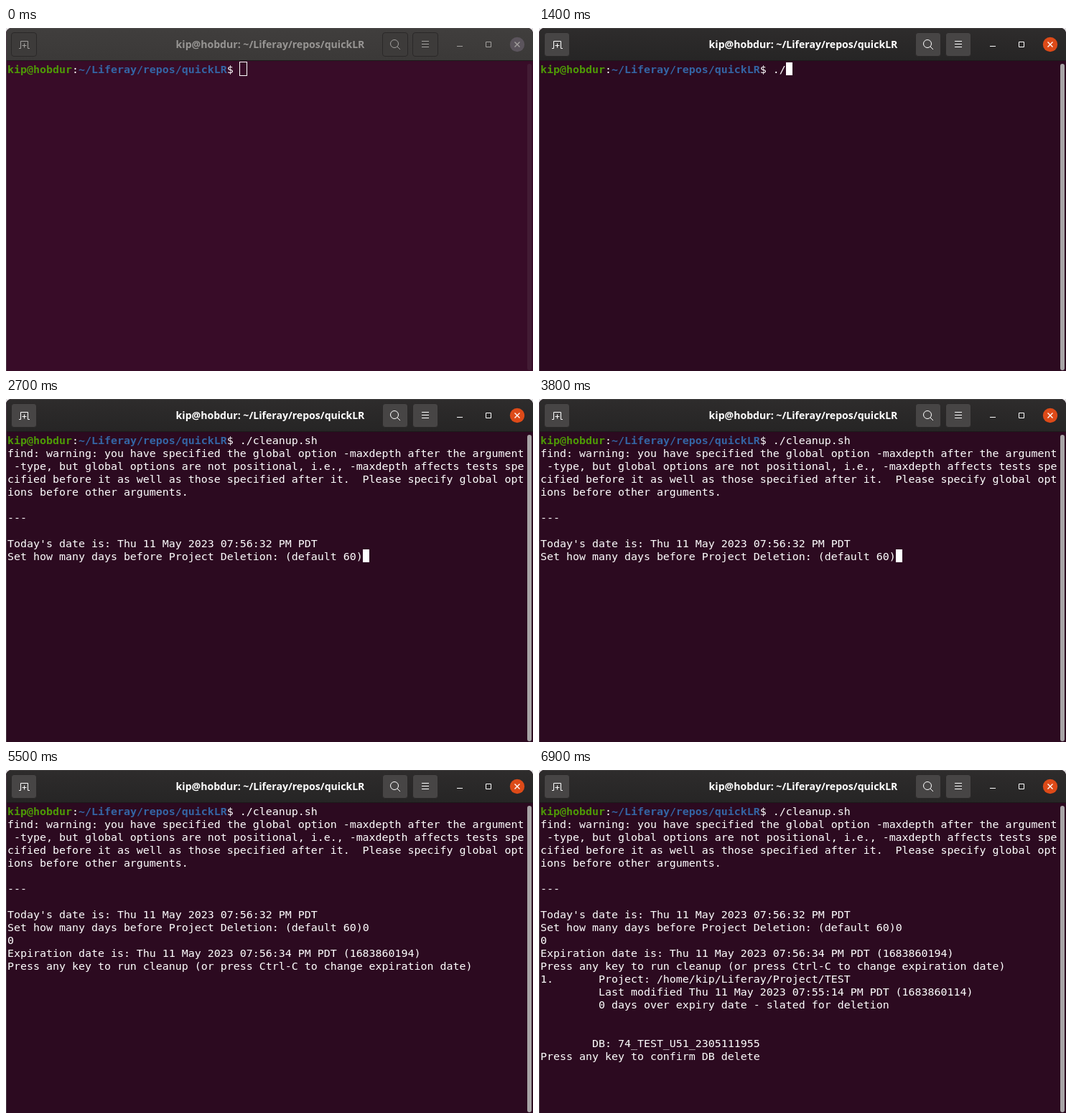
An HTML page for the animation above (8 s loop, 734 by 479 pixels).

```html
<!DOCTYPE html>
<html lang="en">
<head>
<meta charset="utf-8">
<title>Terminal</title>
<style>
  html, body { margin: 0; width: 100%; height: 100%; overflow: hidden; background: #e6e4e6; }
  .win, .win * { animation-duration: 8s; animation-timing-function: step-end; animation-iteration-count: infinite; }
  .win { position: relative; width: 734px; height: 479px; overflow: hidden; border-radius: 8px 8px 0 0; animation-name: body; }
  .win::after { content: ""; position: absolute; inset: 0; border-left: 1px solid #4b3a46; }
  @keyframes body { 0% { background: #380c28; } 6.25%, 100% { background: #2c0a20; } }

  .bar { position: absolute; left: 0; top: 0; width: 734px; height: 46px; box-sizing: border-box; border-bottom: 1px solid #1c1a1a; animation-name: bar; }
  @keyframes bar {
    0% { background: linear-gradient(#403e3d, #3b3938); box-shadow: inset 0 1px #4c4a49; }
    6.25%, 100% { background: linear-gradient(#2e2c2c, #262525); box-shadow: inset 0 1px #434141; }
  }
  .title { position: absolute; left: 0; width: 736px; top: 0; text-align: center; font: bold 14.1px/45px "Noto Sans", sans-serif; animation-name: title; }
  @keyframes title { 0% { color: #979593; } 6.25%, 100% { color: #fff; } }

  svg { position: absolute; left: 0; top: 0; }
  .btn { stroke: #1d1b1b; animation-name: btn; }
  @keyframes btn {
    0% { fill: #3d3b3a; stroke: #2a2828; }
    6.25% { fill: #3c3a3a; }
    7.5% { fill: #424040; }
    8.75%, 100% { fill: #474545; }
  }
  .icon { fill: none; animation-name: icon; }
  @keyframes icon {
    0% { stroke: #a3a19f; }
    6.25% { stroke: #c4c2c2; }
    7.5% { stroke: #e4e3e3; }
    8.75%, 100% { stroke: #fff; }
  }
  .ctl { fill: none; animation-name: ctl; }
  @keyframes ctl { 0% { stroke: #a3a19f; } 6.25%, 100% { stroke: #fff; } }
  .close { animation-name: close; }
  @keyframes close { 0% { fill: #5b545c; } 6.25%, 100% { fill: #dd4a18; } }
  .thumb { animation-name: thumb; }
  @keyframes thumb { 0% { fill: #421c34; } 6.25%, 100% { fill: #a8a4a6; } }

  pre { position: absolute; left: 2px; top: 49px; margin: 0; color: #fff; font: 14.95px/18px "DejaVu Sans Mono", monospace; }
  pre b { color: #4e9a06; }
  pre b + b, pre .path { color: #3465a4; }

  /* text that appears at a given time */
  .t1300 { animation-name: t1300; } @keyframes t1300 { 0% { visibility: hidden; } 16.25%, 100% { visibility: visible; } }
  .t1400 { animation-name: t1400; } @keyframes t1400 { 0% { visibility: hidden; } 17.5%, 100% { visibility: visible; } }
  .t1700 { animation-name: t1700; } @keyframes t1700 { 0% { visibility: hidden; } 21.25%, 100% { visibility: visible; } }
  .t1800 { animation-name: t1800; } @keyframes t1800 { 0% { visibility: hidden; } 22.5%, 100% { visibility: visible; } }
  .t2100 { animation-name: t2100; } @keyframes t2100 { 0% { visibility: hidden; } 26.25%, 100% { visibility: visible; } }
  .t2700 { animation-name: t2700; } @keyframes t2700 { 0% { visibility: hidden; } 33.75%, 100% { visibility: visible; } }
  .t4500 { animation-name: t4500; } @keyframes t4500 { 0% { visibility: hidden; } 56.25%, 100% { visibility: visible; } }
  .t4900 { animation-name: t4900; } @keyframes t4900 { 0% { visibility: hidden; } 61.25%, 100% { visibility: visible; } }
  .t6300 { animation-name: t6300; } @keyframes t6300 { 0% { visibility: hidden; } 78.75%, 100% { visibility: visible; } }
  .t6500 { animation-name: t6500; } @keyframes t6500 { 0% { visibility: hidden; } 81.25%, 100% { visibility: visible; } }
  .t6900 { animation-name: t6900; } @keyframes t6900 { 0% { visibility: hidden; } 86.25%, 100% { visibility: visible; } }

  .cursor { position: absolute; left: 0; top: 0; width: 9px; height: 18px; animation-name: move, fill, blink; }
  @keyframes move {
    0% { transform: translate(326px, 48px); }
    16.25% { transform: translate(335px, 48px); }
    17.5% { transform: translate(344px, 48px); }
    21.25% { transform: translate(353px, 48px); }
    22.5% { transform: translate(362px, 48px); }
    26.25% { transform: translate(443px, 48px); }
    33.75% { transform: translate(497px, 210px); }
    56.25% { transform: translate(506px, 210px); }
    61.25% { transform: translate(650px, 264px); }
    78.75% { transform: translate(2px, 354px); }
    81.25%, 100% { transform: translate(2px, 390px); }
  }
  @keyframes fill {
    0% { background: transparent; outline: 1px solid #fff; }
    6.25%, 100% { background: #fff; outline: 0 solid transparent; }
  }
  @keyframes blink {
    0% { opacity: 1; }
    40% { opacity: 0; }
    47.5% { opacity: 1; }
    68.75% { opacity: 0; }
    78.75% { opacity: 1; }
    86.25%, 100% { opacity: 0; }
  }
</style>
</head>
<body>
<div class="win">
  <div class="bar"></div>
  <div class="title">kip@hobdur: ~/Liferay/repos/quickLR</div>
  <svg width="734" height="479">
    <g class="btn">
      <rect x="7.5" y="6.5" width="35" height="33" rx="3.5"/>
      <rect x="524.5" y="6.5" width="35" height="33" rx="3.5"/>
      <rect x="566.5" y="6.5" width="35" height="33" rx="3.5"/>
    </g>
    <g class="icon">
      <path d="M18 28.5h2.5v-10h10v10H33M22.5 24.5h6M25.5 21.5v6"/>
      <circle cx="541" cy="22" r="5.5"/>
      <path d="M545 26l4 4M579 18.5h10M579 22.5h10M579 26.5h10"/>
    </g>
    <circle class="close" cx="712" cy="23" r="10.2"/>
    <g class="ctl">
      <path d="M628 25.5h8M668.5 19.5h7v7h-7z"/>
      <path d="M708.5 19.5l7 7m0-7l-7 7" stroke-width="1.4"/>
    </g>
    <rect class="thumb" x="726" y="50" width="6" height="428" rx="3"/>
  </svg>
<pre><b>kip@hobdur</b>:<b class="path">~/Liferay/repos/quickLR</b>$ <span class="t1300">.</span><span class="t1400">/</span><span class="t1700">c</span><span class="t1800">l</span><span class="t2100">eanup.sh</span>
<span class="t2700">find: warning: you have specified the global option -maxdepth after the argument
 -type, but global options are not positional, i.e., -maxdepth affects tests spe
cified before it as well as those specified after it.  Please specify global opt
ions before other arguments.

---

Today's date is: Thu 11 May 2023 07:56:32 PM PDT
Set how many days before Project Deletion: (default 60)</span><span class="t4500">0</span>
<span class="t4900">0
Expiration date is: Thu 11 May 2023 07:56:34 PM PDT (1683860194)
Press any key to run cleanup (or press Ctrl-C to change expiration date)</span>
<span class="t6300">1.       Project: /home/kip/Liferay/Project/TEST
         Last modified Thu 11 May 2023 07:55:14 PM PDT (1683860114)
         0 days over expiry date - slated for deletion</span>


<span class="t6500">        DB: 74_TEST_U51_2305111955</span>
<span class="t6900">Press any key to confirm DB delete</span></pre>
  <div class="cursor"></div>
</div>
</body>
</html>
```
